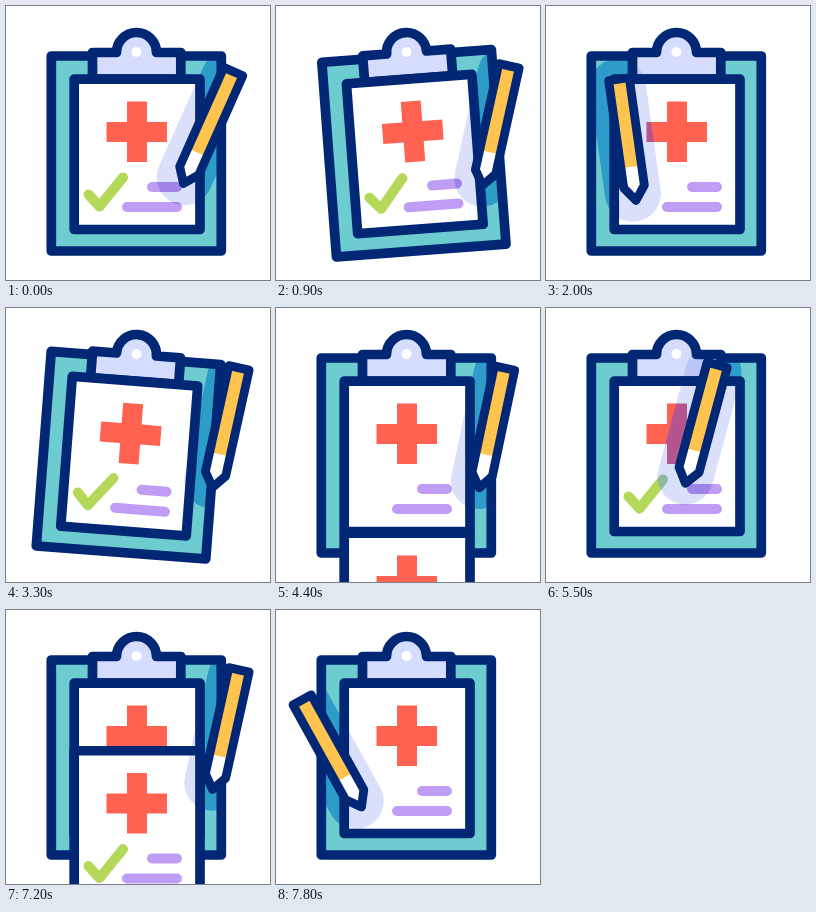
These frames come from a looping animation (264 px wide and 274 px high, 7900 ms). An HTML page with a canvas:

```html
<!DOCTYPE html>
<html lang="en">
<head>
<meta charset="utf-8">
<title>Medical checklist</title>
<style>
html, body { margin: 0; width: 100%; height: 100%; overflow: hidden; background: #fff; }
canvas { display: block; }
</style>
</head>
<body>
<canvas id="stage" width="264" height="274"></canvas>
<script>
const canvas = document.getElementById('stage');
const ctx = canvas.getContext('2d');
const LOOP = 7900, STEP = 100, CYCLE = 2850, START = 1400;
const NAVY = '#022774';
const LIT = { board: '#6dccd0', clip: '#d6dcfd', paper: '#fff', cross: '#ff6250', line: '#bf9df5', check: '#b4d85a' };
const SHADE = { board: '#2e9cc9', clip: '#bcc6f6', paper: '#dadffa', cross: '#b5558f', line: '#9f83e8', check: '#8fb9a0' };

const smooth = u => u * u * (3 - 2 * u);
const out = u => 1 - (1 - u) ** 2;
const linear = u => u;

// Each key: [time, values, easing used to reach it]
const PEN = [
  [1500, [206.5, 179.5, 12.5]],
  [2000, [90, 194.5, -8], smooth],
  [2100, [85.5, 197, -29], linear],
  [2150, [84, 196, -30], out],
  [2350, [95, 203, -22], smooth],
  [2600, [118, 174, 10], smooth],
  [2850, [177.5, 177.5, 24], out],
  [3150, [206.5, 179.5, 12.5], out]
];
const ROCK = [
  [3050, [0]],
  [3300, [4.4], smooth],
  [3750, [-4.3], smooth],
  [4100, [4.4], smooth],
  [4250, [0], smooth]
];
const TICKING = [[2150, [0]], [2350, [1], smooth], [2600, [2], smooth]];
const CHECK = [[82.5, 188.5], [93.5, 200.5], [117, 171.5]];

function sample(keys, t) {
  if (t <= keys[0][0]) return keys[0][1];
  const i = keys.findIndex(k => k[0] >= t);
  if (i < 0) return keys[keys.length - 1][1];
  const [t0, a] = keys[i - 1], [t1, b, ease] = keys[i];
  const u = ease((t - t0) / (t1 - t0));
  return a.map((v, n) => v + (b[n] - v) * u);
}

function shape(path, fill, stroke, width = 9.7) {
  const p = new Path2D(path);
  if (fill) { ctx.fillStyle = fill; ctx.fill(p); }
  if (stroke) { ctx.strokeStyle = stroke; ctx.lineWidth = width; ctx.stroke(p); }
}

function drawCheck(amount, color) {
  if (amount <= 0) return;
  const [a, b, c] = CHECK;
  const mix = (p, q, u) => p.map((v, n) => v + (q[n] - v) * u);
  const points = amount < 1 ? [a, mix(a, b, amount)] : [a, b, mix(b, c, amount - 1)];
  shape('M' + points.join('L'), null, color, 10);
}

function drawPage(colors, check) {
  shape('M68.2 73.2H194V223.5H68.2Z', colors.paper, NAVY);
  shape('M121 95.5h20v20.5h20v20h-20v20h-20v-20h-20.5v-20h20.5z', colors.cross);
  shape('M146 181H171M121 201H171', null, colors.line, 10);
  drawCheck(check, colors.check);
}

function drawBoard(colors, s) {
  ctx.fillStyle = '#fff';
  ctx.fillRect(0, 0, canvas.width, canvas.height);
  ctx.save();
  ctx.translate(130.5, 46);
  ctx.rotate(s.rock);
  ctx.translate(-130.5, -46);
  shape('M45.3 50H215.3V245H45.3Z', colors.board, NAVY);
  shape('M86.5 73V46.5H110.5A20 20 0 0 1 150.5 46.5H174.8V73Z', colors.clip, NAVY);
  shape('M125.5 46a5 5 0 1 0 10 0a5 5 0 1 0-10 0', '#fff');
  drawPage(colors, s.check);
  if (s.drop < 230) {
    ctx.translate(0, s.drop);
    drawPage(colors, 2);
  }
  ctx.restore();
}

function drawPen([x, y, angle]) {
  ctx.save();
  ctx.translate(x, y);
  ctx.rotate(angle * Math.PI / 180);
  const body = 'M0 0L-10.4-14V-122.5H10.4V-14Z';
  shape(body, '#fff');
  shape('M-10.4-34V-122.5H10.4V-34Z', '#ffc34f');
  shape(body, null, NAVY, 8.8);
  ctx.restore();
}

function penShadow([x, y, angle]) {
  const area = new Path2D();
  area.addPath(
    new Path2D('M-28-8V-116A28 28 0 0 1 28-116V-8A28 28 0 0 1-28-8Z'),
    new DOMMatrix().translate(x - 2, y + 1).rotate(angle)
  );
  return area;
}

function render(time) {
  let t = time % CYCLE;
  if (t < START) t += CYCLE;
  const pose = sample(PEN, t);
  const state = {
    rock: sample(ROCK, t)[0] * Math.PI / 180,
    check: sample(TICKING, t)[0],
    drop: 152 * ((t - START) / 150) ** 2
  };
  ctx.lineCap = ctx.lineJoin = 'round';
  // The shaded board becomes the paint for the pen's shadow
  drawBoard(SHADE, state);
  const shaded = ctx.createPattern(canvas, 'no-repeat');
  drawBoard(LIT, state);
  ctx.fillStyle = shaded;
  ctx.fill(penShadow(pose));
  drawPen(pose);
}

const begin = performance.now();
function tick() {
  const time = (performance.now() - begin) % LOOP;
  render(Math.floor(time / STEP) * STEP);
  requestAnimationFrame(tick);
}
tick();
</script>
</body>
</html>
```
